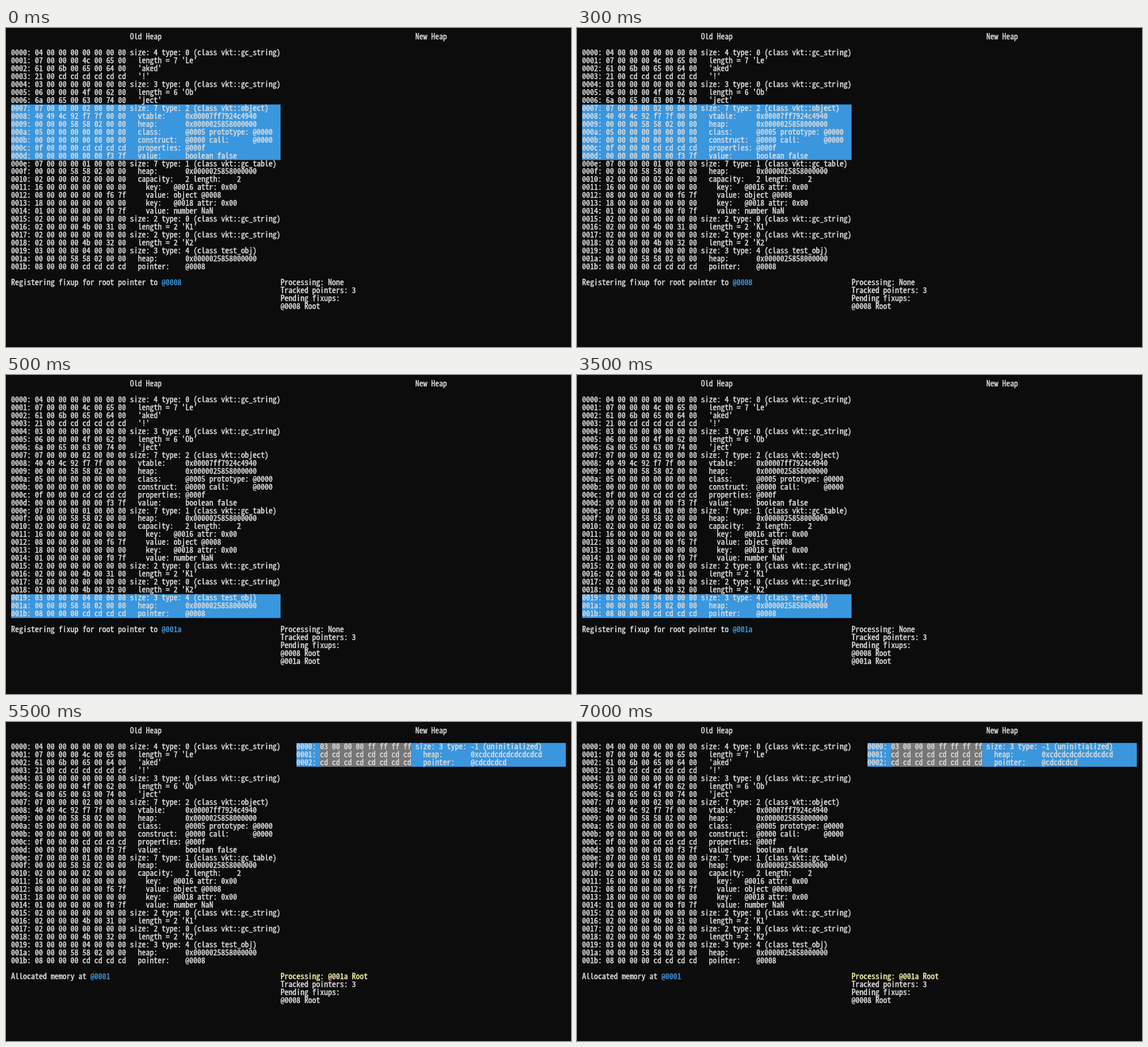
Recreate the animation shown at these times as an HTML page. Size 996 by 562 pixels, loop 8000 ms.

```html
<!DOCTYPE html>
<html lang="en">
<head>
<meta charset="utf-8">
<title>Heap view</title>
<style>
  html, body { margin: 0; width: 100%; height: 100%; overflow: hidden; background: #0c0c0c; }
  svg { display: block; width: 100%; height: 100%; }
  text { white-space: pre; font-variant-ligatures: none; font-kerning: none; stroke-width: .45; }
  path { stroke-width: 1; fill: none; }
</style>
</head>
<body>
<svg id="stage" viewBox="0 0 996 562"></svg>
<script>
const CELL_W = 6.985, CELL_H = 13.97, MARGIN = 9, BASELINE = 11;
const FONT = '13.97px "Noto Sans Mono CJK JP", "Noto Sans Mono", monospace';
const WHITE = '#dcdcdc', BLUE = '#3a96dd', GRAY = '#767676', YELLOW = '#f9f1a5';
const LOOP = 8000, WIDTH = 68, NEW_COL = 72;
const stage = document.getElementById('stage');

// Keep every glyph on the terminal grid, whichever font is found.
const ruler = document.createElement('canvas').getContext('2d');
ruler.font = FONT;
const spacing = CELL_W - ruler.measureText('0').width;

// Drawing on the character grid

const colX = col => MARGIN + col * CELL_W;
const rowY = row => MARGIN + row * CELL_H;

function add(parent, tag, attrs) {
  const el = document.createElementNS('http://www.w3.org/2000/svg', tag);
  for (const key in attrs) el.setAttribute(key, attrs[key]);
  return parent.appendChild(el);
}

function write(parent, col, row, string, color = WHITE) {
  const y = rowY(row) + BASELINE;
  const el = add(parent, 'text', { x: colX(col), y, fill: color, stroke: color });
  el.style.font = FONT;
  el.style.letterSpacing = spacing + 'px';
  el.textContent = string;

  // The terminal face has slashed zeros.
  const slashes = [...string.matchAll(/0/g)]
    .map(zero => `M${colX(col + zero.index + 0.5) - 1.4} ${y - 2.6}l2.8 -5`);
  if (slashes.length) add(parent, 'path', { d: slashes.join(''), stroke: color });
}

function block(parent, col, row, cols, rows, fill) {
  add(parent, 'rect', {
    x: colX(col), y: rowY(row), width: cols * CELL_W, height: rows * CELL_H, fill
  });
}

// Heap contents: each word is eight bytes followed by its meaning

const hex = (value, digits) => value.toString(16).padStart(digits, '0');
const ref = value => '@' + hex(value, 4);

function bytes(value, count = 4) {
  const unsigned = BigInt.asUintN(count * 8, BigInt(value));
  return hex(unsigned, count * 2).match(/../g).reverse().join(' ');
}

const word = (data, note) => data.padEnd(23, ' cd') + ' ' + note;
const pair = (a, b) => bytes(a) + ' ' + bytes(b);
const tagged = (payload, tag) => bytes(payload, 6) + ' ' + bytes(tag, 2);
const field = (data, label, value) => word(data, '  ' + (label + ':').padEnd(12) + value);

const header = (size, type, name) =>
  word(pair(size, type), `size: ${size} type: ${type} (${name})`);
const record = (type, name, ...body) =>
  [header(body.length + 1, type, name), ...body];
const heapField = (address = 0x25858000000n) =>
  field(bytes(address, 8), 'heap', '0x' + hex(address, 16));
const pointer = (label, target) => field(bytes(target), label, ref(target));

function stringRecord(text) {
  const utf16 = part => [...part].map(ch => bytes(ch.charCodeAt(0), 2)).join(' ');
  const head = text.slice(0, 2), rest = text.slice(2).match(/.{1,4}/g) || [];
  return record(0, 'class vkt::gc_string',
    word(bytes(text.length) + ' ' + utf16(head), `  length = ${text.length} '${head}'`),
    ...rest.map(part => word(utf16(part), `  '${part}'`)));
}

function objectRecord(vtable, type, properties) {
  return record(2, 'class vkt::object',
    field(bytes(vtable, 8), 'vtable', '0x' + hex(vtable, 16)),
    heapField(),
    field(pair(type, 0), 'class', `${ref(type)} prototype: ${ref(0)}`),
    field(pair(0, 0), 'construct', `${ref(0)} call:      ${ref(0)}`),
    pointer('properties', properties),
    field(tagged(0, 0x7ff3), 'value', 'boolean false'));
}

function tableRecord(...entries) {
  const count = entries.length;
  return record(1, 'class vkt::gc_table',
    heapField(),
    field(pair(count, count), 'capacity', `${count} length:    ${count}`),
    ...entries.flatMap(({ key, payload, tag, shown }) => [
      word(pair(key, 0), `    key:   ${ref(key)} attr: 0x00`),
      word(tagged(payload, tag), `    value: ${shown}`)
    ]));
}

const oldHeap = [
  stringRecord('Leaked!'),
  stringRecord('Object'),
  objectRecord(0x7ff7924c4940n, 5, 0xf),
  tableRecord(
    { key: 0x16, payload: 8, tag: 0x7ff6, shown: 'object ' + ref(8) },
    { key: 0x18, payload: 1, tag: 0x7ff0, shown: 'number NaN' }),
  stringRecord('K1'),
  stringRecord('K2'),
  record(4, 'class test_obj', heapField(), pointer('pointer', 8))
].flat();

const newHeap = record(-1, 'uninitialized',
  heapField(0xcdcdcdcdcdcdcdcdn), pointer('pointer', 0xcdcdcdcd));

function dump(parent, col, words) {
  words.forEach((line, i) => write(parent, col, i + 2, `${hex(i, 4)}: ${line}`));
}

// Collector steps

const FIXUP = 'Registering fixup for root pointer to ';
const steps = [
  {
    start: 0, message: FIXUP, target: '@0008', fixups: ['@0008 Root'],
    blocks: [[0, 9, WIDTH, 7, BLUE]]
  },
  {
    start: 500, message: FIXUP, target: '@001a', fixups: ['@0008 Root', '@001a Root'],
    blocks: [[0, 27, WIDTH, 3, BLUE]]
  },
  {
    start: 5500, message: 'Allocated memory at ', target: '@0001', fixups: ['@0008 Root'],
    processing: '@001a Root', copy: newHeap,
    blocks: [[NEW_COL, 2, WIDTH, 3, BLUE], [NEW_COL + 6, 2, 23, 3, GRAY]]
  }
];

const under = add(stage, 'g'), fixed = add(stage, 'g'), over = add(stage, 'g');

write(fixed, 30, 0, 'Old Heap');
write(fixed, NEW_COL + 30, 0, 'New Heap');
dump(fixed, 0, oldHeap);
write(fixed, WIDTH, 32, 'Tracked pointers: 3');
write(fixed, WIDTH, 33, 'Pending fixups:');

for (const step of steps) {
  const back = add(under, 'g'), front = add(over, 'g');
  step.layers = [back, front];
  step.blocks.forEach(args => block(back, ...args));
  write(front, 0, 31, step.message);
  write(front, step.message.length, 31, step.target, BLUE);
  write(front, WIDTH, 31, 'Processing: ' + (step.processing || 'None'),
    step.processing ? YELLOW : WHITE);
  step.fixups.forEach((line, i) => write(front, WIDTH, 34 + i, line));
  if (step.copy) dump(front, NEW_COL, step.copy);
}

function render(time) {
  const current = steps.findLast(step => time >= step.start);
  for (const step of steps)
    for (const layer of step.layers)
      layer.setAttribute('visibility', step === current ? 'visible' : 'hidden');
}

const origin = performance.now();
function tick() {
  render((performance.now() - origin) % LOOP);
  requestAnimationFrame(tick);
}
tick();
</script>
</body>
</html>
```
